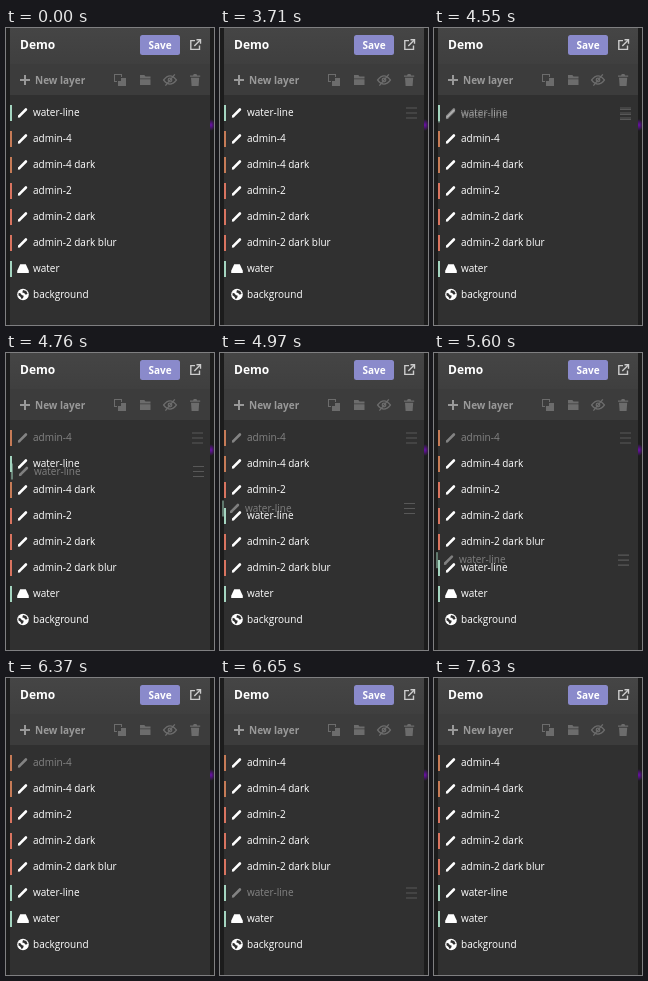
These frames come from a looping animation (208x297 px, 8750 ms). An HTML page:

```html
<!DOCTYPE html>
<html lang="en">
<head>
<meta charset="utf-8">
<title>Layer list</title>
<style>
  html, body { margin: 0; width: 100%; height: 100%; overflow: hidden; background: #1c1c1c; }
  svg { display: block; width: 208px; height: 297px; }
  text { font: 10px "Open Sans", sans-serif; fill: #fff; }
  .bold { font-weight: 700; }
  .title { font-size: 12px; }
</style>
</head>
<body>
<svg viewBox="0 0 208 297">
  <defs>
    <linearGradient id="head" x2="0" y2="1">
      <stop offset="0" stop-color="#454545"/>
      <stop offset="1" stop-color="#3f3f3f"/>
    </linearGradient>
    <radialGradient id="glow">
      <stop offset="0" stop-color="#6d0fae"/>
      <stop offset="1" stop-color="#6d0fae" stop-opacity="0"/>
    </radialGradient>
    <g id="pen">
      <path d="M13.3 3.6 19.9-3" stroke="#fff" stroke-width="2.6" stroke-linecap="round"/>
      <path d="M11.8 5.3 12.5 2.4 14.6 4.5Z" fill="#fff"/>
    </g>
    <path id="fill" d="M14.2-4.2h5.6l3 6.4v2.3H11.2V2.2Z" fill="#fff"/>
    <g id="globe">
      <circle cx="17" cy="0" r="5.8" fill="#fff"/>
      <path d="M12.7-1.7l2 .6 1 1.6 2 .8-.4 1.8-1.5 1.6-1.4-2.4-2-1.6ZM17-4.5l3.2 1.1 1.4 2.6-1.8 1-1.7-1.6-1.8-.6Z" fill="#303030"/>
    </g>
    <path id="grip" d="M186-5h11M186 0h11M186 5h11" stroke="#585858" stroke-width="1.2"/>
  </defs>

  <rect width="208" height="297" fill="#1c1c1c"/>
  <ellipse cx="205" cy="97" rx="4" ry="6" fill="url(#glow)"/>
  <rect x="4" width="200" height="297" fill="#303030"/>
  <rect x="4" width="200" height="67" fill="#3c3c3c"/>
  <rect x="4" width="200" height="36" fill="url(#head)"/>

  <text class="bold title" x="14" y="21">Demo</text>
  <rect x="134" y="7" width="40" height="20" rx="2.5" fill="#8a8acb"/>
  <text class="bold" x="142.4" y="20.7">Save</text>
  <g fill="none" stroke="#ccc" stroke-width="1.4">
    <path d="M189 12.6h-4.2v8.8h8.7v-4M188.3 18l5.7-5.7"/>
    <path d="M190.5 11.7h4v4"/>
  </g>

  <path d="M14 52h10M19 47v10" stroke="#999" stroke-width="2"/>
  <text class="bold" x="29" y="56" style="fill:#999">New layer</text>
  <g fill="#6c6c6c">
    <path d="M108 46h8v3h-5v5h-3Z"/>
    <rect x="112" y="50" width="8" height="8"/>
    <path d="M109 47h6v6h-6Z" fill="#3c3c3c"/>
    <path d="M134 47h4.3l1.2 1.4h5v2H134ZM134 51.2h10.5V57H134Z"/>
    <path d="M184 47.4h3l.8-1.4h2.6l.8 1.4h3v1.4H184ZM185 49.8h8.2l-.6 8.2h-7Z"/>
  </g>
  <g fill="none" stroke="#6c6c6c" stroke-width="1.3">
    <path d="M157.6 52Q164 43.8 170.4 52Q164 60.2 157.6 52Z"/>
    <circle cx="164" cy="52" r="1.8"/>
    <path d="M159.4 57.6l9.4-11.2"/>
  </g>
  <g id="list"></g>
</svg>

<script>
const LOOP = 8750, TICK = 70, TOP = 84.5, PITCH = 26, DIM = 0.4;
const GREEN = "#a4d5c0", BROWN = "#c67b57", RED = "#d97460";
const LIFT = 4550, DROP = 6370;

const layers = [
  ["water-line", "pen", GREEN],
  ["admin-4", "pen", BROWN],
  ["admin-4 dark", "pen", BROWN],
  ["admin-2", "pen", RED],
  ["admin-2 dark", "pen", RED],
  ["admin-2 dark blur", "pen", RED],
  ["water", "fill", GREEN],
  ["background", "globe", null]
];

// [time, x offset, y centre] of the dragged copy
const path = [
  [4550, 0, 86], [4620, 1, 93], [4690, 1, 105], [4760, 1, 118],
  [4970, -2, 155], [5110, -2, 173], [5320, -2, 194], [5390, -2, 196.7],
  [5530, -2, 204], [5740, -2, 212]
];

// [row, grip shown from, until]; the text follows one tick later
const hovers = [[0, 3710, 6370], [5, 6510, 7560], [2, 7560, 7630]];

const svgNS = "http://www.w3.org/2000/svg";
const list = document.getElementById("list");

function add(parent, tag, attrs = {}) {
  const node = document.createElementNS(svgNS, tag);
  for (const key in attrs) node.setAttribute(key, attrs[key]);
  return parent.appendChild(node);
}

function makeRow([name, icon, color]) {
  const root = add(list, "g");
  const bar = add(root, "rect", { x: 4, y: -7.5, width: 2, height: 16, fill: color || "none" });
  const label = add(root, "g");
  add(label, "use", { href: "#" + icon });
  add(label, "text", { x: 27, y: 3.5 }).textContent = name;
  const grip = add(root, "use", { href: "#grip", y: 0.5 });
  return { root, bar, label, grip };
}

const rows = layers.map(makeRow);
const ghost = makeRow(layers[0]);
ghost.bar.setAttribute("opacity", 0.5);
ghost.label.setAttribute("opacity", 0.38);

function place(row, x, y) {
  row.root.setAttribute("transform", `translate(${x} ${y})`);
}

function show(node, on) {
  node.setAttribute("visibility", on ? "visible" : "hidden");
}

function ghostAt(t) {
  const next = path.findIndex(p => p[0] > t);
  if (next < 0) return path[path.length - 1].slice(1);
  if (next === 0) return path[0].slice(1);
  const a = path[next - 1], b = path[next];
  const k = (t - a[0]) / (b[0] - a[0]);
  return [a[1] + (b[1] - a[1]) * k, a[2] + (b[2] - a[2]) * k];
}

function draw(time) {
  const t = Math.floor((time % LOOP) / TICK) * TICK;
  const [gx, gy] = ghostAt(t);
  const slot = t < LIFT ? 0 : Math.round((gy - TOP) / PITCH);

  rows.forEach((row, i) => {
    const index = i === 0 ? slot : i <= slot ? i - 1 : i;
    const active = (from, to) => hovers.some(h => h[0] === index && t >= h[1] + from && t < h[2] + to);
    place(row, 0, TOP + index * PITCH);
    show(row.grip, active(0, 0));
    const dim = active(TICK, TICK) && !(index === 2 && t >= 7630);
    row.label.setAttribute("opacity", dim ? DIM : 1);
  });

  show(ghost.root, t >= LIFT && t < DROP);
  show(ghost.grip, t >= LIFT && t < DROP);
  place(ghost, gx, gy);
}

const start = performance.now();
function frame() {
  draw(performance.now() - start);
  requestAnimationFrame(frame);
}
draw(0);
requestAnimationFrame(frame);
</script>
</body>
</html>
```
